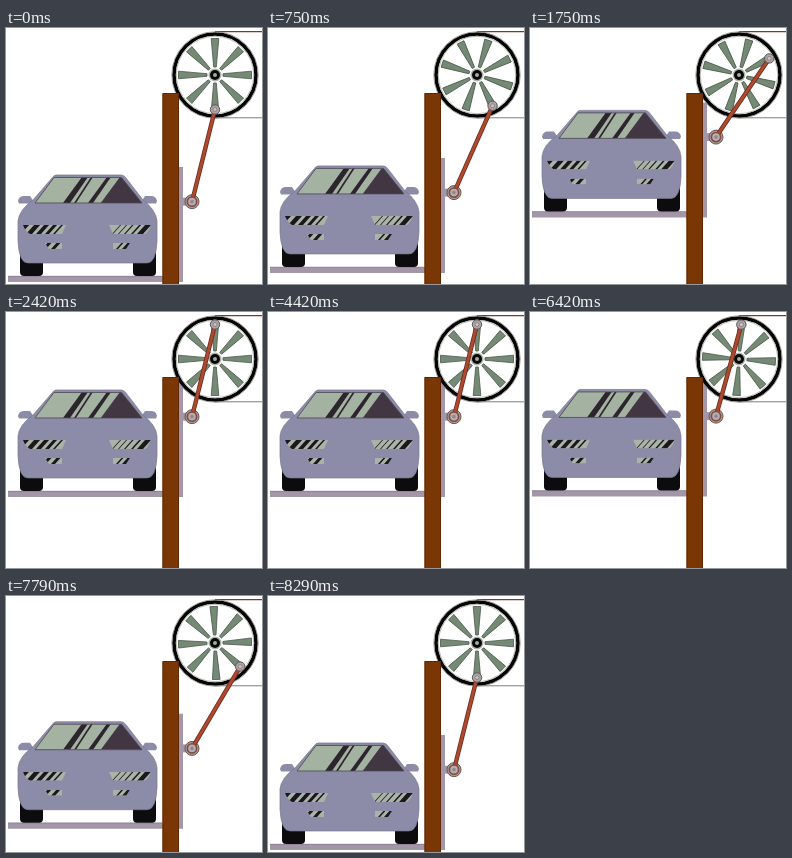
Recreate the animation shown at these times as an HTML page. Size 256 by 256 pixels, loop 8.75 s.

```html
<!DOCTYPE html>
<html lang="en">
<head>
<meta charset="utf-8">
<title>Crank car lift</title>
<style>
html, body { margin: 0; width: 100%; height: 100%; overflow: hidden; background: #fff; }
svg { display: block; width: 100vw; height: 100vh; }
</style>
</head>
<body>
<svg viewBox="0 0 256 256">
  <defs>
    <clipPath id="glass"><path d="M48 149.500H115.500L136 175H29Z"/></clipPath>
    <clipPath id="lampL"><path d="M17 197H60L56 206H24Q19 203 17 197Z"/></clipPath>
    <clipPath id="lampR"><path d="M103 197H145Q143 203 139 206H107Z"/></clipPath>
    <clipPath id="fogL"><path d="M39 215H56V221H43Z"/></clipPath>
    <clipPath id="fogR"><path d="M107 215H124L120 221H107Z"/></clipPath>
  </defs>

  <g id="lift">
    <path d="M173 139H177V254H2V248H173Z" fill="#a396a8"/>
    <path d="M2 248.300H156" stroke="#83778a" stroke-width=".7"/>
    <g fill="#0c0c0e">
      <rect x="14" y="222" width="23" height="26" rx="4"/>
      <rect x="127" y="222" width="23" height="26" rx="4"/>
    </g>
    <g fill="#8d8ca8">
      <path d="M12 173Q13 168 18 168H24L28 174L25 175.500H13Z"/>
      <path d="M151 173Q150 168 145 168H139L135 174L138 175.500H150Z"/>
      <path d="M50 147H115Q118 147 120 150L137 172Q150 182 151 193V213Q150 235 141 235H22Q13 235 12 213V193Q13 182 27 172L46 150Q48 147 50 147Z" stroke="#77768f" stroke-width=".7"/>
    </g>
    <g clip-path="url(#glass)">
      <path d="M28 148H138V176H28Z" fill="#a3b2a1"/>
      <g fill="#2c252d">
        <path d="M76 149H82L64 175H57Z"/>
        <path d="M85 149H87L70 175H68Z"/>
        <path d="M101 149H105L87 175H82Z"/>
      </g>
      <path d="M114 149H120L138 176H94Z" fill="#423642"/>
    </g>
    <path d="M48 149.500H115.500L136 175H29Z" fill="none" stroke="#4c4650" stroke-width=".8"/>
    <g id="lamps"></g>
  </g>

  <path d="M209 3.700H256" stroke="#7a3b28" stroke-width="1.200"/>
  <path d="M209 89.800H256" stroke="#807c78"/>

  <g transform="translate(209 47)">
    <g id="wheel"></g>
    <circle r="41" fill="none" stroke="#050505" stroke-width="3.600"/>
    <circle r="43.200" fill="none" stroke="#8c8984" stroke-width=".8"/>
    <circle r="38.700" fill="none" stroke="#a5aaa0" stroke-width=".8"/>
    <circle r="6.500" fill="#aeb4aa"/>
    <circle r="5" fill="#080808"/>
    <circle r="2" fill="#a5aaa0"/>
  </g>

  <path d="M156.500 65H173V256H156.500Z" fill="#7b3606"/>
  <path d="M157 256V65.500H172.500V256" fill="none" stroke="#5f2803"/>

  <g id="wrist">
    <path d="M-10 -4H-4V4H-10Z" fill="#a396a8"/>
    <circle r="7" fill="#a59ba0" stroke="#6b5550"/>
  </g>
  <path id="rodEdge" stroke="#682c20" stroke-width="4.400"/>
  <path id="rod" stroke="#b0482d" stroke-width="2.800"/>
  <g id="wristCap">
    <circle r="4.600" fill="#b5aeb2" stroke="#864838" stroke-width="1.600"/>
    <circle r="1.800" fill="#8f8890"/>
  </g>
  <g id="pin">
    <circle r="4.700" fill="#aaa5a8" stroke="#5d5558"/>
    <circle r="2" fill="#c9c4c6" stroke="#8a6b66" stroke-width=".7"/>
  </g>
</svg>
<script>
const $ = id => document.getElementById(id);
const LOOP = 8750, TICK = 1000 / 24;
const HUB = { x: 209, y: 47 }, CRANK = 34.5, ROD = 95, WRIST_X = 186, LOW_Y = 173.7;

function buildSpokes() {
  let out = '';
  for (let a = 0; a < 360; a += 45) {
    out += `<path transform="rotate(${a})" d="M-1.300 -8L-3.800 -36.500H3.800L1.300 -8Z" fill="#758a74" stroke="#48584a" stroke-width=".8"/>`;
  }
  $('wheel').innerHTML = out;
}

// A lamp is a light panel crossed by slanted dark bars: [left, width].
function lamp(clip, x, y, w, h, bars) {
  const slant = h * 0.9;
  const marks = bars.map(([dx, bw]) =>
    `<path d="M${x + dx + slant} ${y}h${bw}l${-slant} ${h}h${-bw}Z" fill="#1b171d"/>`).join('');
  return `<g clip-path="url(#${clip})"><rect x="${x}" y="${y}" width="${w}" height="${h}" fill="#a9b3a6"/>${marks}</g>`;
}

function buildLamps() {
  $('lamps').innerHTML =
    lamp('lampL', 17, 197, 43, 9, [[-8, 6], [3, 6], [13, 5], [22, 4], [30, 2]]) +
    lamp('lampR', 103, 197, 42, 9, [[3, 1], [9, 1], [15, 1.5], [22, 2], [28, 6]]) +
    lamp('fogL', 39, 215, 17, 6, [[-3, 4], [6, 4]]) +
    lamp('fogR', 107, 215, 17, 6, [[3, 2], [9, 5]]);
}

// Share of a stroke done, advancing in even ticks.
function stroke(t, start, ticks) {
  const n = Math.floor((t - start + 10) / TICK) + 1;
  return Math.min(Math.max(n / ticks, 0), 1);
}

function draw(t) {
  const up = t < 500 ? 0 : stroke(t, 500, 47);
  const down = t < 6420 ? 0 : stroke(t, 6420, 46);
  const turn = Math.PI * (up - down);
  const x = HUB.x + CRANK * Math.sin(turn);
  const y = HUB.y + CRANK * Math.cos(turn);
  const wristY = y + Math.sqrt(ROD ** 2 - (x - WRIST_X) ** 2);
  const place = (id, px, py) => $(id).setAttribute('transform', `translate(${px} ${py})`);

  place('lift', 0, wristY - LOW_Y);
  place('wrist', WRIST_X, wristY);
  place('wristCap', WRIST_X, wristY);
  place('pin', x, y);
  $('wheel').setAttribute('transform', `rotate(${-turn * 180 / Math.PI})`);
  for (const id of ['rodEdge', 'rod']) $(id).setAttribute('d', `M${x} ${y}L${WRIST_X} ${wristY}`);
}

buildSpokes();
buildLamps();
const begin = performance.now();
function tick() {
  draw((performance.now() - begin) % LOOP);
  requestAnimationFrame(tick);
}
tick();
</script>
</body>
</html>
```
